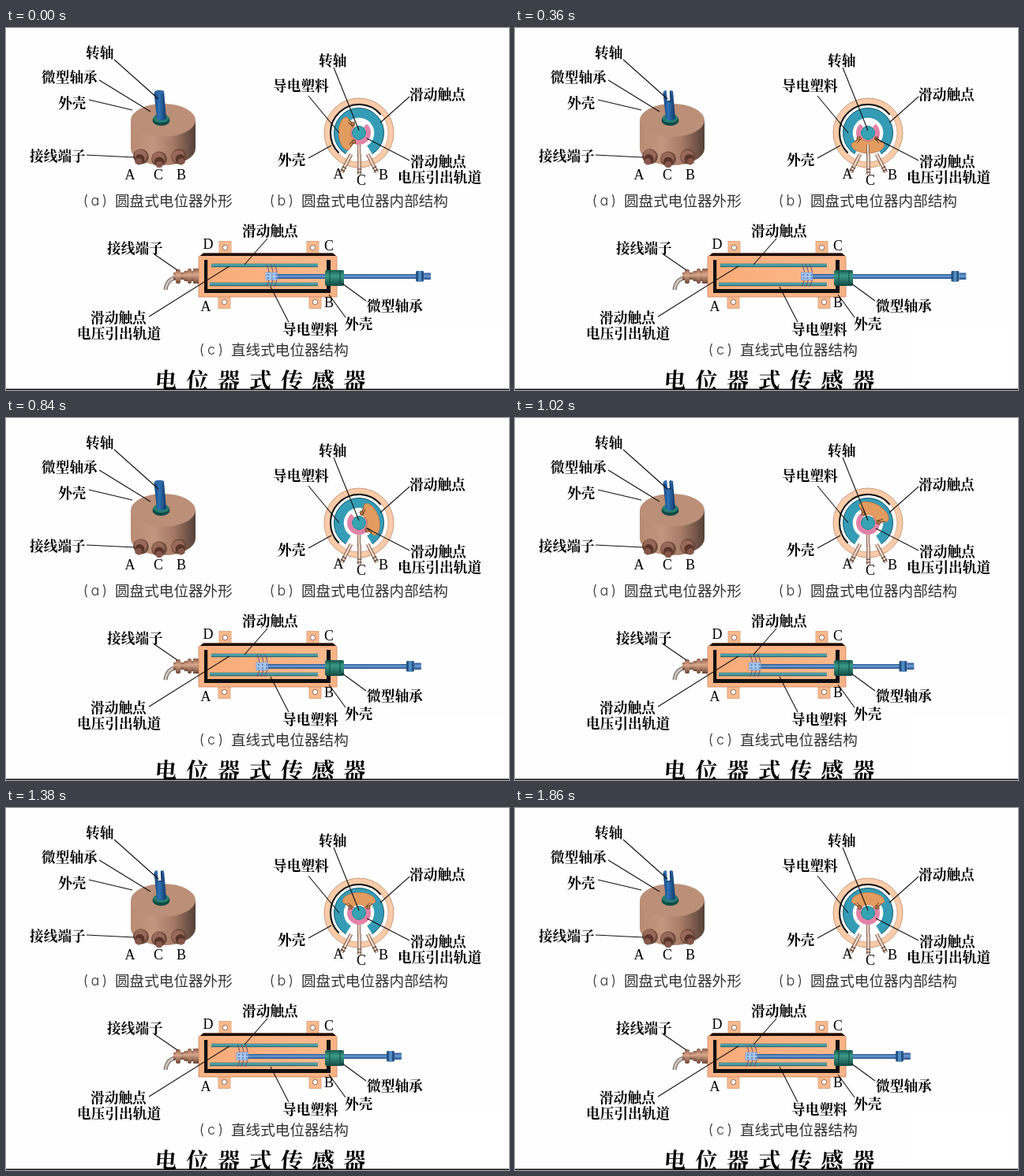
An HTML page that plays this animation: 637x459 px, repeating every 1920 ms.

```html
<!DOCTYPE html>
<html lang="zh-CN">
<head>
<meta charset="utf-8">
<style>
  html, body { margin: 0; width: 100%; height: 100%; overflow: hidden; background: #fefefe; }
  svg { display: block; }
  .label { font: 600 17.7px "Noto Serif CJK SC", "Noto Sans CJK SC", serif; }
  .caption { font: 300 18.6px "Noto Sans CJK SC", sans-serif; fill: #333; }
  .index { font: 300 18px Inter, sans-serif; font-feature-settings: "cv11"; fill: #333; text-anchor: middle; }
  .letter { font: 18px "Liberation Serif", serif; text-anchor: middle; }
  .title { font: 800 28px "Noto Serif CJK SC", "Noto Sans CJK SC", serif; text-anchor: middle; }
  #leaders { stroke: #111; stroke-width: 1.1; }
</style>
</head>
<body>
<svg width="637" height="459" viewBox="0 0 637 459">
  <defs>
    <linearGradient id="body">
      <stop offset="0" stop-color="#b98b73"/><stop offset=".35" stop-color="#c2967f"/>
      <stop offset=".65" stop-color="#a67a65"/><stop offset="1" stop-color="#544038"/>
    </linearGradient>
    <linearGradient id="shaft">
      <stop offset="0" stop-color="#123a70"/><stop offset=".4" stop-color="#2f74b8"/>
      <stop offset="1" stop-color="#123765"/>
    </linearGradient>
    <linearGradient id="rod" x2="0" y2="1">
      <stop offset="0" stop-color="#2b528c"/><stop offset=".45" stop-color="#6a9fd6"/>
      <stop offset="1" stop-color="#274c85"/>
    </linearGradient>
    <linearGradient id="bush" x2="0" y2="1">
      <stop offset="0" stop-color="#15584f"/><stop offset=".35" stop-color="#3b9a86"/>
      <stop offset="1" stop-color="#124b45"/>
    </linearGradient>
    <linearGradient id="brass" x2="0" y2="1">
      <stop offset="0" stop-color="#8a5c49"/><stop offset=".4" stop-color="#d9a88c"/>
      <stop offset="1" stop-color="#6b4435"/>
    </linearGradient>
    <linearGradient id="floor">
      <stop offset="0" stop-color="#f9ab78"/><stop offset="1" stop-color="#fab98c"/>
    </linearGradient>
    <g id="terminal">
      <ellipse rx="10" ry="9.5" fill="#6d4a3c"/>
      <ellipse cx="-1" cy="-1" rx="8" ry="7.5" fill="#98695a"/>
      <ellipse cy="3" rx="6" ry="5.5" fill="#5a342a"/>
      <rect x="-4" y="3" width="8" height="8" rx="3" fill="#85574a"/>
    </g>
    <g id="tab">
      <rect x="-7.5" y="-8" width="15" height="16" fill="#fab98c" stroke="#d79870" stroke-width=".8"/>
      <circle r="3.2" fill="#fff" stroke="#8a6551"/>
    </g>
    <g id="pin">
      <path d="M0 0V26" stroke="#80604f" stroke-width="4.6"/>
      <path d="M0 0V26" stroke="#f1dccd" stroke-width="2.4"/>
      <path d="M-3 19H3M-3 23H3" stroke="#553c32" stroke-width="1.2"/>
    </g>
  </defs>

  <rect x="498" y="379" width="132" height="78" fill="#fff"/>

  <!-- outside view -->
  <path d="M158 118V153A41 21 0 0 0 240 153V118Z" fill="url(#body)"/>
  <ellipse cx="199" cy="117" rx="41" ry="21" fill="#bb8f78"/>
  <ellipse cx="196.500" cy="117" rx="11" ry="7" fill="#0d4a46"/>
  <ellipse cx="196.500" cy="114.500" rx="10" ry="5.500" fill="#277d70"/>
  <path d="M187.500 82Q193 77 200 80L203 115Q197 119 191 115Z" fill="url(#shaft)"/>
  <ellipse cx="193.800" cy="81.500" rx="6" ry="2.800" fill="#2f6aa8"/>
  <path id="slot" fill="#fefefe"/>
  <path id="slotEdge" fill="none" stroke="#0c2b54" stroke-width="1.2"/>
  <use href="#terminal" transform="translate(171 163) rotate(28)"/>
  <use href="#terminal" x="194" y="166"/>
  <use href="#terminal" transform="translate(219 163) rotate(-28)"/>

  <!-- inside view -->
  <g transform="translate(447 133)">
    <circle r="44" fill="#f9cba8" stroke="#c99b7e"/>
    <circle r="37" fill="#fff" stroke="#c9a48d" stroke-width=".8"/>
    <path id="shade" fill="none" stroke="#111" stroke-width="2"/>
    <path id="track" fill="none" stroke="#359cb6" stroke-width="12.5"/>
    <path id="rim" fill="none" stroke="#1d5d70" stroke-width="1"/>
    <path id="ring" fill="none" stroke="#e282a6" stroke-width="6"/>
    <g id="wiper">
      <path d="M-21-14Q-21-19-16-22Q0-30 16-22Q21-19 21-14L9-5A10 10 0 0 0-9-5Z" fill="#e39c60" stroke="#b8794a" stroke-width=".8"/>
      <path d="M-17-12L-10-5M-14-13L-8-7M17-12L10-5M14-13L8-7" stroke="#684027"/>
      <path d="M-13-9h4v4h-4zM10-9h4v4h-4z" fill="#bd7a49" stroke="#54351f" stroke-width=".7"/>
    </g>
    <circle r="8.500" fill="#36a3b3" stroke="#247480"/>
    <use href="#pin" transform="translate(-10 27) rotate(27)"/>
    <use href="#pin" transform="translate(11 27) rotate(-27)"/>
    <path d="M0 15V30" stroke="#80604f" stroke-width="4"/>
    <path d="M0 15V30" stroke="#f1dccd" stroke-width="2"/>
    <use href="#pin" x=".5" y="27"/>
  </g>

  <!-- linear type -->
  <use href="#tab" x="277.5" y="278.500"/><use href="#tab" x="388.500" y="278.500"/>
  <use href="#tab" x="276.500" y="347.500"/><use href="#tab" x="391.500" y="347.500"/>
  <path d="M244 290L250 285.500H414L419 290V341H244Z" fill="#f9b285" stroke="#c48661" stroke-width=".8"/>
  <path d="M246 289L250 285.500H414L418 289Z" fill="#1b0f0b"/>
  <path d="M251 294H255.500V331H406V294H411V336H251Z" fill="#111"/>
  <rect x="255.500" y="292" width="150.500" height="39" fill="url(#floor)"/>
  <path d="M260 301H395M258 325H395" stroke="#2b6f78" stroke-width="4.500"/>
  <path d="M260 300.500H395M258 324.500H395" stroke="#58b0b4" stroke-width="2"/>
  <path d="M202 332Q204 317 217 317" fill="none" stroke="#6b625c" stroke-width="5"/>
  <path d="M202 332Q204 317 217 317" fill="none" stroke="#d0c5bc" stroke-width="2.800"/>
  <g fill="url(#brass)">
    <rect x="212" y="310" width="16" height="9"/><rect x="215" y="306" width="6" height="18" rx="2"/>
    <rect x="225" y="308" width="14" height="13" rx="2"/><rect x="230" y="305" width="5" height="19" rx="2"/>
    <rect x="237" y="305" width="7" height="19"/>
  </g>
  <g id="slider">
    <rect x="306" y="312" width="178" height="6" fill="url(#rod)"/>
    <path d="M293 300Q300 313 293 328M298 300Q305 313 298 328M303 300Q310 313 303 328" fill="none" stroke="#70546a" stroke-width="1.100"/>
    <rect x="292" y="310" width="14.500" height="9.500" fill="#a5c6ee" stroke="#7f9fd2" stroke-width=".8"/>
    <path d="M294 313H306M294 317H306" stroke="#4c70ab" stroke-width="1.500" stroke-dasharray="2 3"/>
    <rect x="482" y="308" width="10" height="13.500" rx="1.500" fill="#245184"/>
    <rect x="485" y="308" width="4" height="13.500" fill="#4f8dc2"/>
    <rect x="492" y="310.500" width="9" height="8.500" rx="1" fill="url(#rod)"/>
  </g>
  <rect x="404" y="307" width="24" height="20" rx="2" fill="url(#bush)"/>
  <path d="M410 307V327M423 307V327" stroke="#0d4641"/>

  <path id="leaders" d="M137 40L193 90M118 66L183 106M105 91L160 104M102 161L163 164
    M415 50L447 130M383 86L422 133M511 87L474 120M383 165L412 149M511 168L457 140
    M331 267L302 300M188 287L217 307M181 366L283 302M358 373L335 328M456 346L426 324M430 367L409 338"/>
  <g id="texts"></g>
  <rect y="457.500" width="637" height="1.500" fill="#111"/>
</svg>
<script>
const NS = "http://www.w3.org/2000/svg";
const byId = id => document.getElementById(id);
const rad = deg => deg * Math.PI / 180;

function put(kind, x, midY, text, drop = 6.8) {
  const el = document.createElementNS(NS, "text");
  el.setAttribute("class", kind);
  el.setAttribute("x", x);
  el.setAttribute("y", midY + drop);
  el.textContent = text;
  byId("texts").append(el);
  return el;
}

[
  [101, 31, "转轴"], [45, 62, "微型轴承"], [66, 95, "外壳"], [30, 162, "接线端子"],
  [396, 41, "转轴"], [338, 73, "导电塑料"], [511, 84, "滑动触点"], [344, 167, "外壳"],
  [512, 169, "滑动触点"], [496, 189, "电压引出轨道"],
  [299, 257, "滑动触点"], [128, 279, "接线端子"], [107, 367, "滑动触点"],
  [90, 387, "电压引出轨道"], [350, 382, "导电塑料"], [457, 352, "微型轴承"], [429, 375, "外壳"]
].forEach(([x, y, s]) => put("label", x, y, s));

[
  [157, 186, "A"], [193, 186, "C"], [222, 186, "B"],
  [421, 185, "A"], [450, 193, "C"], [478, 186, "B"],
  [256, 274, "D"], [409, 276, "C"], [253, 353, "A"], [409, 348, "B"]
].forEach(([x, y, s]) => put("letter", x, y, s, 6));

[
  [97, 219, "a", "圆盘式电位器外形"],
  [333, 219, "b", "圆盘式电位器内部结构"],
  [244, 408, "c", "直线式电位器结构"]
].forEach(([x, y, key, s]) => {
  put("index", x + 4, y, "(", 6);
  put("index", x + 16, y, key, 6);
  put("index", x + 28, y, ")", 6);
  put("caption", x + 41, y, s, 7);
});

[..."电位器式传感器"].forEach((ch, i) => {
  const x = 202 + i * 39.8;
  put("title", 0, 0, ch, 0).setAttribute("transform", `translate(${x} 456.500) skewX(-4)`);
});

// Angles run anticlockwise from the right.
function arc(r, from, to) {
  const at = a => `${r * Math.cos(rad(a))} ${-r * Math.sin(rad(a))}`;
  return `M${at(from)}A${r} ${r} 0 ${to - from > 180 ? 1 : 0} 0 ${at(to)}`;
}
byId("track").setAttribute("d", arc(25.5, -58, 238));
byId("rim").setAttribute("d", arc(31.5, -58, 238));
byId("shade").setAttribute("d", arc(36, 40, 225));
byId("ring").setAttribute("d", arc(12, 130, 410));

const STEP = 60, STEPS = 32;
const turn = [[0, 183], [6, 270], [9, 317], [14, 377], [19, 450], [STEPS, 450]];

function angleAt(n) {
  const i = turn.findIndex(([end]) => n < end);
  const [n0, a0] = turn[i - 1], [n1, a1] = turn[i];
  return a0 + (a1 - a0) * (n - n0) / (n1 - n0);
}

function draw(angle) {
  const sin = Math.sin(rad(angle));
  byId("wiper").setAttribute("transform", `rotate(${90 - angle})`);
  byId("slider").setAttribute("transform", `translate(${35.2 * (1 - sin)} 0)`);

  const gap = Math.max(0, Math.abs(sin) - 0.45) * 9;
  const depth = gap * 2.8;
  byId("slot").setAttribute("d", gap ? `M${194 - gap / 2} 77h${gap}L${195 + gap / 2.4} ${79 + depth}h${-gap / 1.2}Z` : "");
  byId("slotEdge").setAttribute("d", gap ? `M${194 + gap / 2} 80L${195 + gap / 2.4} ${79 + depth}h${-gap / 1.2}` : "");
}

const start = performance.now();
function tick() {
  draw(angleAt(Math.floor((performance.now() - start) / STEP) % STEPS));
  requestAnimationFrame(tick);
}
tick();
</script>
</body>
</html>
```
